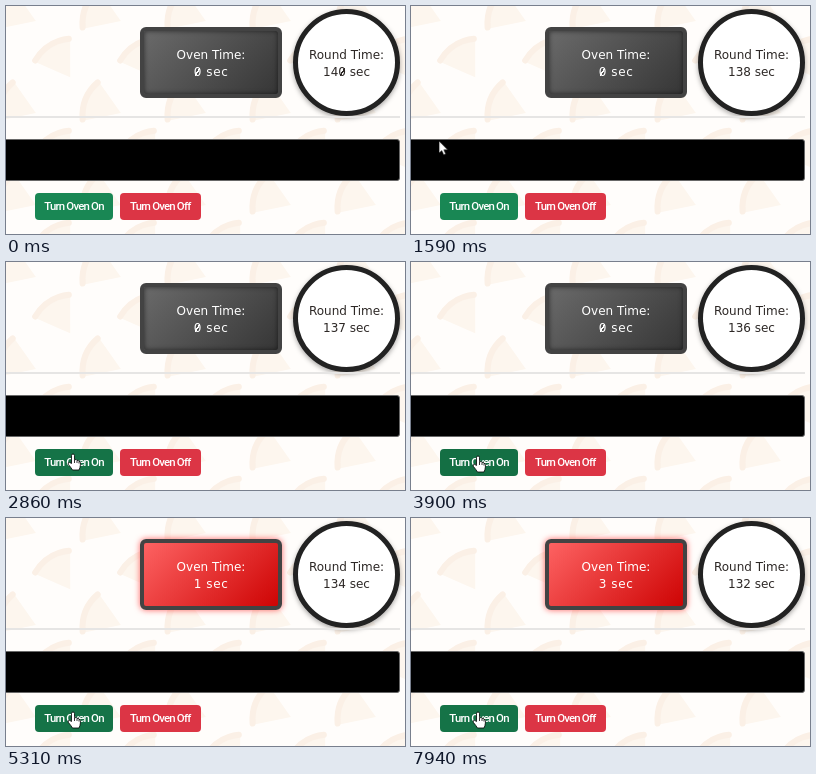
Recreate the animation shown at these times as an HTML page. Size 399 px wide and 228 px high, loop 8000 ms.

```html
<!DOCTYPE html>
<html lang="en">
<head>
<meta charset="utf-8">
<title>Oven timer</title>
<style>
  html, body { margin: 0; width: 100%; height: 100%; overflow: hidden; background: #fffdfb; }
  * { box-sizing: border-box; }
  .stage { position: relative; width: 399px; height: 228px; overflow: hidden; }
  .stage > * { position: absolute; }
  .wallpaper { left: 0; top: 0; }

  .dial {
    display: flex; flex-direction: column; justify-content: center; padding-top: 2px;
    font: 12px/17px "DejaVu Sans", sans-serif; text-align: center; white-space: pre;
  }
  .zero {
    background: linear-gradient(to bottom right, transparent 43%, currentColor 43% 57%, transparent 57%)
      center / 5px 8px no-repeat;
  }
  .oven {
    left: 134px; top: 21px; width: 142px; height: 71px;
    border: 4px solid #434343; border-radius: 6px; color: #fff;
    animation: heat 8s step-end infinite;
  }
  .oven .value { letter-spacing: .6px; }
  .round {
    left: 287px; top: 3px; width: 107px; height: 107px;
    border: 5px solid #222; border-radius: 50%; background: #fff; color: #2d2826;
    box-shadow: 0 2px 5px rgba(0, 0, 0, .35);
  }
  .rule { left: 0; top: 110px; width: 394px; height: 2px; background: #e6e5e4; }
  .conveyor {
    left: -5px; top: 133px; width: 399px; height: 42px;
    border: 1px solid #686868; border-radius: 3px; background: #000;
  }

  .button {
    top: 187px; height: 27px; border-radius: 4px; color: #fff;
    font: 500 11.4px/27px Roboto, sans-serif; letter-spacing: -.8px;
    text-align: center; white-space: nowrap;
  }
  .on { left: 29px; width: 78px; background: #198754; animation: press 8s linear infinite; }
  .off { left: 114px; width: 80.5px; background: #dc3545; }

  .cursor { left: 0; top: 0; width: 16px; height: 20px; animation: travel 8s linear infinite; }
  .arrow { animation: arrow 8s step-end infinite; }
  .hand { animation: hand 8s step-end infinite; }

  @keyframes heat {
    0% { background: linear-gradient(135deg, #6c6c6c, #343434) border-box;
         box-shadow: inset 0 0 5px rgba(0, 0, 0, .55); }
    49.4%, 100% { background: linear-gradient(135deg, #f66, #c00) border-box;
         box-shadow: 0 0 6px rgba(255, 0, 0, .6); }
  }
  @keyframes press {
    0%, 29% { background: #198754; }
    31%, 47% { background: #157347; }
    47.8%, 48.4% { background: #146c43; }
    49.4%, 100% { background: #157347; }
  }
  @keyframes travel {
    0%, 15.3% { transform: translate(-20px, 126px); }
    15.5% { transform: translate(1px, 128px); }
    19.87% { transform: translate(28px, 135px); }
    25% { transform: translate(50px, 153px); }
    29% { transform: translate(61px, 186px); }
    32%, 38.1% { transform: translate(67px, 192px); }
    38.2%, 40.3% { transform: translate(67px, 193px); }
    40.5%, 100% { transform: translate(67px, 194px); }
  }
  @keyframes arrow { 0% { opacity: 1; } 29%, 100% { opacity: 0; } }
  @keyframes hand { 0% { opacity: 0; } 29%, 100% { opacity: 1; } }
</style>
</head>
<body>
<div class="stage">
  <svg class="wallpaper" width="399" height="228">
    <defs>
      <g id="slice">
        <path d="M-21-10Q0-22 21-12L2 21Z" fill="#fdf6ee"/>
        <path d="M-20-11Q0-22 20-13" fill="none" stroke="#fbf0e6" stroke-width="6" stroke-linecap="round"/>
      </g>
      <pattern id="slices" x="-33" y="-38" width="85" height="92" patternUnits="userSpaceOnUse">
        <use href="#slice" transform="translate(43 46) rotate(-65)"/>
        <g id="corner">
          <use href="#slice" transform="translate(0 0) rotate(-30)"/>
          <use href="#slice" transform="translate(85 0) rotate(-30)"/>
        </g>
        <use href="#corner" y="92"/>
      </pattern>
    </defs>
    <rect width="399" height="228" fill="url(#slices)"/>
  </svg>

  <div class="dial oven"><div>Oven Time:</div><div class="value" id="oven"><span class="zero">0</span> sec</div></div>
  <div class="dial round"><div>Round Time:</div><div class="value" id="round">14<span class="zero">0</span> sec</div></div>
  <div class="rule"></div>
  <div class="conveyor"></div>
  <div class="button on">Turn Oven On</div>
  <div class="button off">Turn Oven Off</div>

  <svg class="cursor" id="cursor" overflow="visible">
    <path class="arrow" d="M0 0V12L2.7 9.6 4.6 13.8 6.6 12.9 4.8 8.8H8.6Z" fill="#fff" stroke="#000" stroke-width=".5"/>
    <g class="hand" stroke="#000" stroke-width=".8" stroke-linejoin="round">
      <path d="M-1.5 9.5V1.5Q-1.5 0 0 0T1.5 1.5V5.8Q3.6 5 4 6.4 5.8 5.8 6 7.4 7.4 7 7.4 8.8V11Q7.2 13.5 6 16H-.5Q-2 13.5-4.8 10.2-5.2 8-3.3 8.4Z" fill="#fff"/>
      <path d="M1.5 6V9M4 6.5V9M6 7.5V9.5" fill="none"/>
    </g>
  </svg>
</div>
<script>
  const roundTicks = [250, 1250, 2290, 3300, 4380, 5310, 6290, 7280];
  const ovenTicks = [4980, 6040, 6950, 7940];
  const lead = 16; // a change must already show on the frame it is due
  const clock = document.getElementById('cursor').getAnimations()[0];

  const passed = (ticks, time) => ticks.filter(tick => time + lead >= tick).length;

  function show(id, seconds) {
    const label = document.getElementById(id);
    if (label.dataset.seconds === String(seconds)) return;
    label.dataset.seconds = seconds;
    label.innerHTML = String(seconds).replace(/0/g, '<span class="zero">0</span>') + ' sec';
  }

  function draw() {
    const time = (clock.currentTime || 0) % 8000;
    show('round', 140 - passed(roundTicks, time));
    show('oven', passed(ovenTicks, time));
    requestAnimationFrame(draw);
  }
  draw();
</script>
</body>
</html>
```
